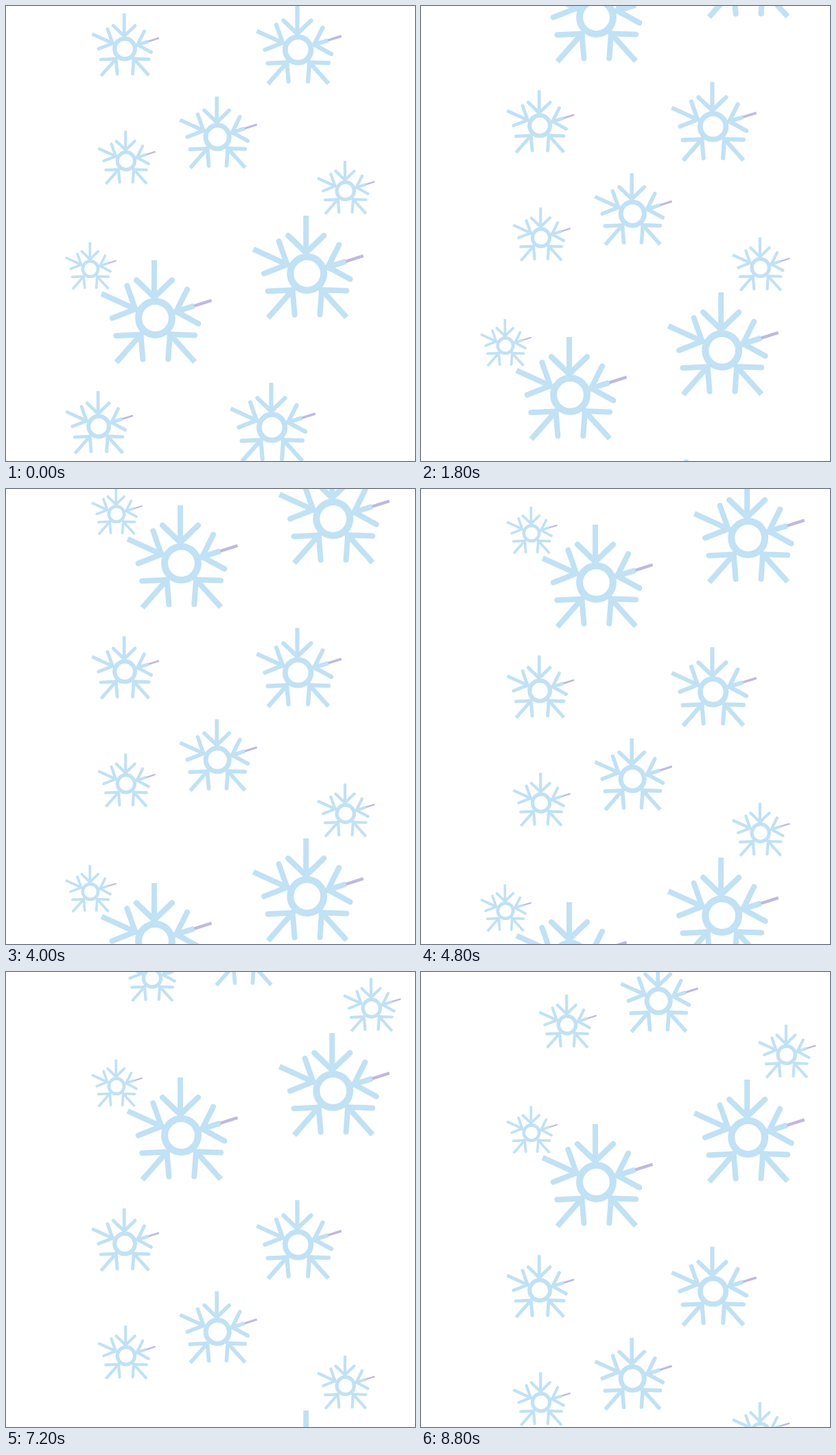
Write an HTML page that moves like this. It is 596 by 664 pixels and loops after 9 s.

```html
<!DOCTYPE html>
<html lang="en">
<head>
<meta charset="utf-8">
<title>Snowfall</title>
<style>
  html, body { margin: 0; width: 100%; height: 100%; overflow: hidden; background: #fff; }
  svg { display: block; }
  #flake { fill: none; stroke: #c1e1f4; stroke-width: 8; }
  .tint { stroke: #bfb9e1; }
</style>
</head>
<body>
<svg width="596" height="664" viewBox="0 0 596 664">
  <defs>
    <path id="stem" d="M0 -86V-28"/>
    <path id="barbs" d="M-26 -57L0 -32L26 -57" stroke-linecap="round" stroke-linejoin="round"/>
    <g id="flake"></g>
    <g id="field"></g>
  </defs>
  <g id="snow">
    <use href="#field"/>
    <use href="#field" x="38" y="-551"/>
  </g>
</svg>
<script>
const LOOP = 9000, STEP = 200;
const $ = id => document.getElementById(id);

// One arm points up; the others are the same arm turned about the centre.
const arm = (transform, stem = '<use href="#stem"/>') =>
  `<g transform="${transform}">${stem}<use href="#barbs"/></g>`;
const tintedStem = `<g class="tint">
  <path d="M0 -86V-58" stroke-width="4.500"/>
  <path d="M25 -56L26.500 -57.500" stroke-width="7.500" stroke-linecap="round"/>
  </g><path d="M0 -59.500V-28"/>`;

$('flake').innerHTML = '<circle r="24.4" stroke-width="10"/>' +
  arm('translate(-1.5 1.5)') + arm('rotate(72.5)', tintedStem) +
  [138, 221.3, 294.5].map(angle => arm(`rotate(${angle})`)).join('');

// x, y, scale
const flakes = [
  [308.2, 191.2, .7], [175, 226.1, .52], [494.7, 269.8, .52], [438.7, 390.5, 1],
  [123, 383.6, .46], [217.5, 455.5, 1], [387.6, 614.9, .77], [135.1, 613.5, .61]
];
$('field').innerHTML = flakes.map(([x, y, scale]) =>
  `<use href="#flake" transform="translate(${x} ${y}) scale(${scale})"/>`).join('');

// The fall slows and quickens: time in ms, distance in px
const fall = [[0, 0], [1000, 74], [2800, 160], [5800, 268], [7200, 334], [8800, 402]];

function distance(t) {
  const i = Math.max(1, fall.findIndex(([end]) => t <= end));
  const [t0, y0] = fall[i - 1], [t1, y1] = fall[i];
  return 2 * Math.round((y0 + (y1 - y0) * (t - t0) / (t1 - t0)) / 2);
}

const start = performance.now();
function draw() {
  const t = (performance.now() - start) % LOOP;
  $('snow').setAttribute('transform', `translate(0 ${distance(Math.floor(t / STEP) * STEP)})`);
  requestAnimationFrame(draw);
}
draw();
</script>
</body>
</html>
```
